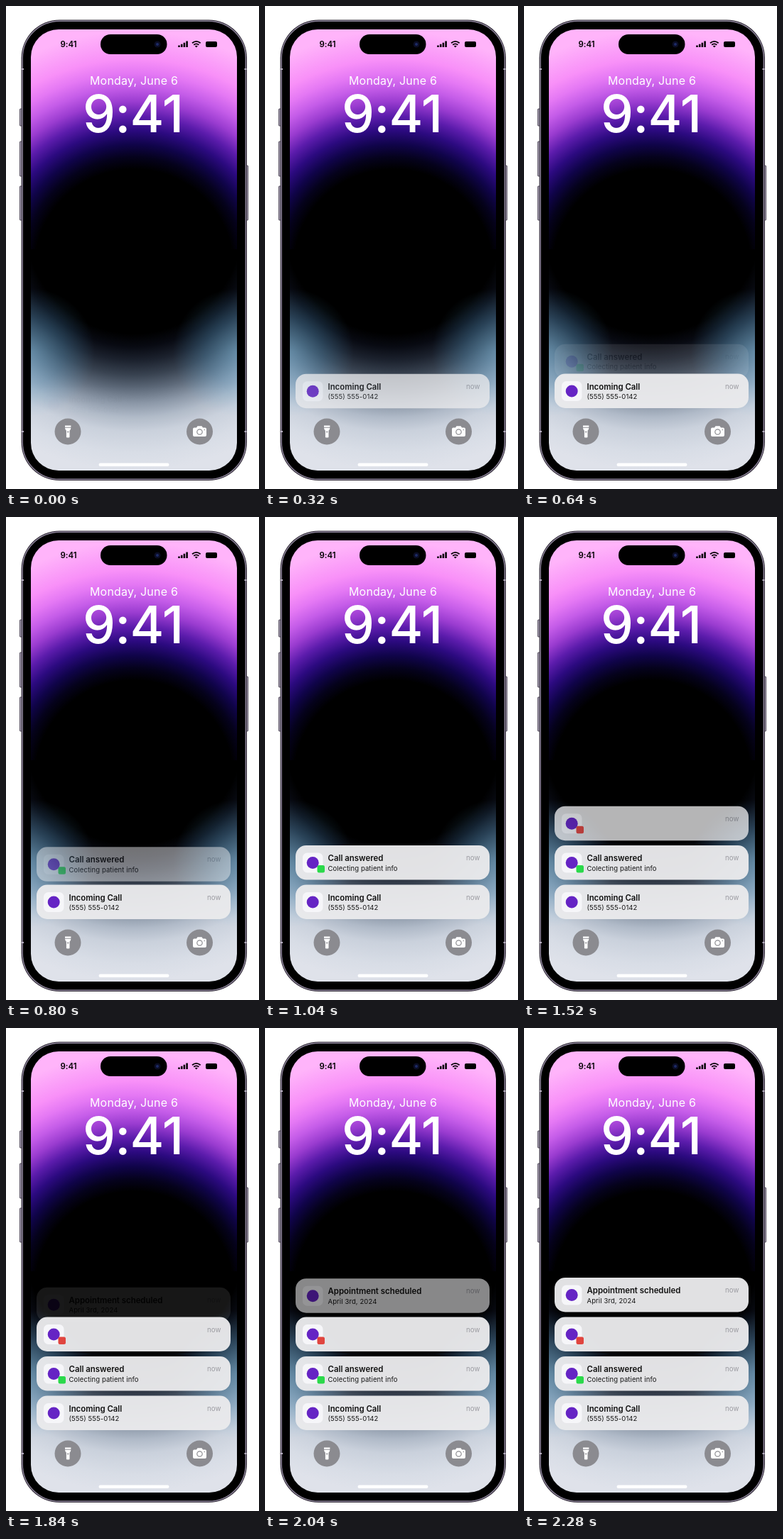
An HTML page that plays this animation: 356 by 681 pixels, repeating every 3.04 s.

```html
<!DOCTYPE html>
<html lang="en">
<head>
<meta charset="utf-8">
<style>
html, body { margin: 0; width: 100%; height: 100%; overflow: hidden; background: #fff; }
svg {
  position: absolute; left: 0; top: 0;
  font-family: Inter, "Liberation Sans", sans-serif; font-feature-settings: "calt" 0;
}
#screen {
  position: absolute; left: 35px; top: 33px; width: 290px; height: 622px; border-radius: 39px;
  background:
    radial-gradient(circle at 0 455px, #6eb4dc70, #50a0d040 45px, #0000 90px),
    radial-gradient(circle at 290px 455px, #6eb4dc70, #50a0d040 45px, #0000 90px),
    radial-gradient(circle at 145px 337px, #000 140px, #05021c 157px, #10044a 175px, #2c0a80 195px,
      #5c1cac 215px, #9a3cd0 235px, #c45ce8 255px, #e478f4 275px, #f890f8 295px, #ffb4fa 335px)
      0 0 / 290px 310px no-repeat,
    radial-gradient(circle at 145px -33px, #000 152px, #080a12 170px, #1c222e 190px, #384250 210px,
      #5e6a7a 230px, #8a96a6 250px, #b0bac8 270px, #cad1dc 290px, #d8dde6 320px, #dfe2ea 345px)
      0 310px / 290px 312px no-repeat,
    #000;
}
.title { font-weight: 600; font-size: 11.4px; fill: #111; }
.sub { font-size: 9.5px; fill: #161616; letter-spacing: .1px; }
.now { font-size: 9.8px; fill: #9c9ca2; text-anchor: end; }
</style>
</head>
<body>
<svg width="356" height="681">
  <g fill="#a79fb2" stroke="#332d3b" stroke-width=".8">
    <rect x="19.400" y="145" width="4" height="24" rx="1"/>
    <rect x="19.400" y="191" width="4" height="49" rx="1"/>
    <rect x="19.400" y="254" width="4" height="48" rx="1"/>
    <rect x="336.600" y="225" width="4" height="77" rx="1"/>
  </g>
  <rect x="21.500" y="19.500" width="317.500" height="649.500" rx="54" fill="#2a2430"/>
  <rect x="23.200" y="21.200" width="314.100" height="646.100" rx="52.300" fill="#000" stroke="#8f869c" stroke-width="1.400"/>
  <path d="M22 89h3M22 600h3M335.500 89h3M335.500 600h3" stroke="#b8b0c2" stroke-width="2"/>
</svg>
<div id="screen"></div>
<svg width="356" height="681">
  <rect x="133" y="40" width="93.500" height="28" rx="14"/>
  <circle cx="213" cy="54" r="4.500" fill="#0b0d24"/>
  <circle cx="213" cy="54" r="2" fill="#1d2a66"/>
  <text x="88" y="57.500" font-size="11.500" font-weight="600" text-anchor="middle">9:41</text>
  <path d="M243.500 58v-2.500M247.200 58v-4.200M250.900 58v-6.300M254.600 58v-8.500" stroke="#000" stroke-width="2.500"/>
  <path d="M262 52.300q5.800-4.800 11.600 0M264.200 54.800q3.600-2.800 7.200 0" fill="none" stroke="#000" stroke-width="1.800"/>
  <path d="M265.800 56.500q2-1.400 4 0l-2 2z"/>
  <rect x="281" y="50" width="16" height="8" rx="2"/>
  <g fill="#fff" text-anchor="middle">
    <text x="180" y="110.500" font-size="16" letter-spacing=".2">Monday, June 6</text>
    <text x="178.700" y="178" font-size="73" font-weight="500" letter-spacing="-.8">9:41</text>
  </g>
  <g fill="#8b8b90">
    <circle cx="87" cy="600" r="18.500"/>
    <circle cx="272.500" cy="600" r="18.500"/>
  </g>
  <g fill="#fff">
    <path d="M83 591.500h8.400v2.300h-8.400zM83 594.800h8.400q0 2-1.900 4v8.700q0 1-1 1h-2.600q-1 0-1-1v-8.700q-1.900-2-1.900-4z"/>
    <path d="M265 594.500h3l1.500-2.200h6l1.500 2.200h3q2 0 2 2v8.500q0 2-2 2h-15q-2 0-2-2v-8.500q0-2 2-2z"/>
    <rect x="130.500" y="644.500" width="99" height="4.500" rx="2.200"/>
  </g>
  <circle cx="87.200" cy="600.500" r="1.100" fill="#8b8b90"/>
  <circle cx="272.500" cy="600.500" r="3.700" fill="none" stroke="#8b8b90" stroke-width="1.200"/>
  <circle cx="279.300" cy="597.500" r=".8" fill="#8b8b90"/>
  <g id="cards"></g>
</svg>
<script>
const LOOP = 3040, FADE = 400, RISE = 19;
const cards = [
  { start: 0, y: 518.5, title: "Incoming Call", sub: "(555) 555-0142" },
  { start: 600, y: 463, title: "Call answered", sub: "Colecting patient info", badge: "#2bd94b" },
  { start: 1200, y: 407.5, title: "", sub: "", badge: "#e0453f" },
  { start: 1800, y: 352, title: "Appointment scheduled", sub: "April 3rd, 2024" }
];
const list = document.getElementById("cards");

for (const card of cards) {
  card.el = document.createElementNS("http://www.w3.org/2000/svg", "g");
  card.el.innerHTML = `
    <rect x="43" width="273" height="48.500" rx="15" fill="#ebebed" fill-opacity=".96"/>
    <rect x="53" y="10.500" width="28.500" height="28" rx="6.500" fill="#f6f6f9"/>
    <circle cx="67.200" cy="24.500" r="8.500" fill="#6524c4"/>
    ${card.badge ? `<rect x="73.500" y="28" width="10.500" height="10.500" rx="2.500" fill="${card.badge}"/>` : ""}
    <text class="title" x="88.500" y="22">${card.title}</text>
    <text class="sub" x="88.500" y="35.500">${card.sub}</text>
    <text class="now" x="302.500" y="21">now</text>`;
  list.prepend(card.el); // newer cards slide out from behind older ones
}

const begin = performance.now();

function draw() {
  const time = (performance.now() - begin) % LOOP;
  for (const { el, start, y } of cards) {
    const p = Math.min(1, Math.max(0, (time - start) / FADE));
    el.setAttribute("opacity", p);
    el.setAttribute("transform", `translate(0 ${y + RISE * (1 - p) ** 3})`);
  }
  requestAnimationFrame(draw);
}
draw();
</script>
</body>
</html>
```
